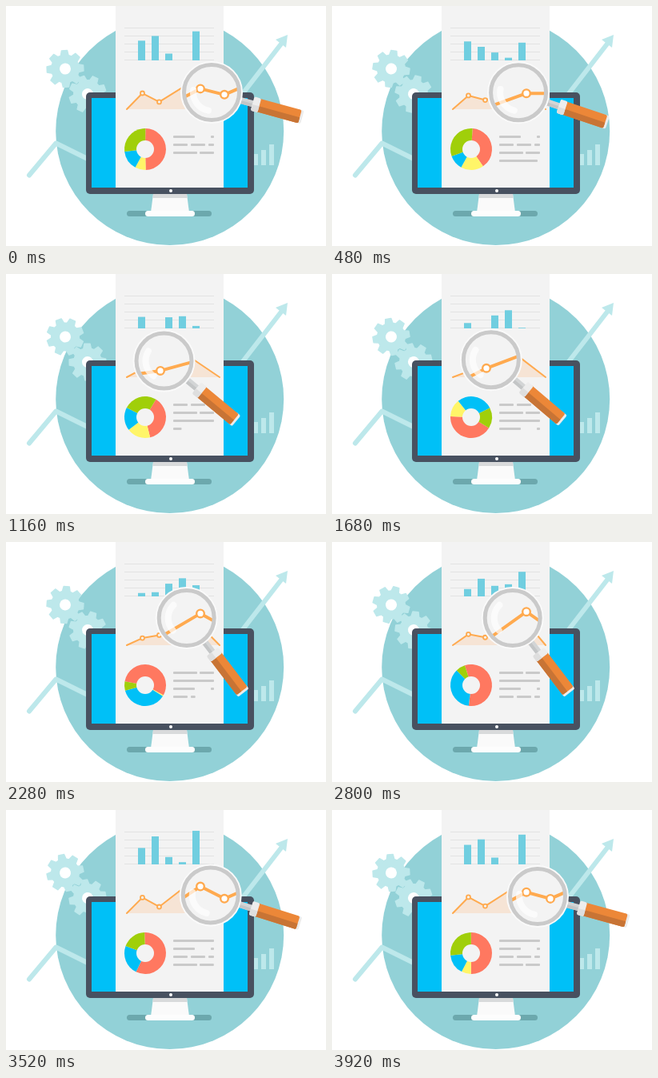
An HTML page with a canvas that plays this animation: 400x300 px, repeating every 3960 ms.

```html
<!DOCTYPE html>
<html lang="en">
<head>
<meta charset="utf-8">
<title>Report analysis</title>
<style>
  html, body { margin: 0; width: 100%; height: 100%; overflow: hidden; background: #fff; }
  canvas { display: block; width: 400px; height: 300px; }
</style>
</head>
<body>
<canvas id="stage"></canvas>
<script>
const LOOP = 3960;
const TAU = Math.PI * 2;
const RAD = TAU / 360;
const LIGHT = '#bde8eb', PAPER = '#f3f3f3', ORANGE = '#ffaa4f', GREY = '#cacaca';

const canvas = document.getElementById('stage');
const ctx = canvas.getContext('2d');
const ratio = window.devicePixelRatio || 1;
canvas.width = 400 * ratio;
canvas.height = 300 * ratio;

const clamp = (v, low, high) => Math.min(high, Math.max(low, v));
const mix = (a, b, p) => a + (b - a) * p;
const ease = p => (1 - Math.cos(Math.PI * clamp(p, 0, 1))) / 2;

// One swing per loop, highest at `peak` degrees of the cycle.
const wave = (mean, swing, peak) => t =>
  mean + swing * Math.cos(t / LOOP * TAU - peak * RAD);
const still = y => () => y;

const bars = [
  wave(14.5, 10.5, 15),
  wave(14, 21, -38),
  wave(12.5, 4, 175),
  wave(12, 12, 180),
  wave(21, 21, -43)
];

const chart = [
  [151, still(129)],
  [170.5, wave(115.3, 6.5, 165)],
  [191.5, wave(117.5, 3.5, -45)],
  [233, wave(96.5, 9.5, 105)],
  [267, still(129)]
];

const zoomed = [
  [150, wave(131, 16, 210)],
  [193, wave(123.5, 6, -10)],
  [243, wave(98.5, 11.5, 65)],
  [273, wave(108, 3, -20)],
  [305, still(97)]
];

const yellowShare = wave(28, 50, 88);
const blueShare = wave(88, 47, 225);
const greenShare = wave(68, 46, 50);

// The magnifier travels between three resting poses.
const right = { x: 257, y: 108, angle: 15.3 };
const left = { x: 197.5, y: 108.6, angle: 39.7 };
const upper = { x: 225.7, y: 95, angle: 52.7 };
const moves = [
  { from: right, to: left, start: 0, end: 1100, lift: 1, swing: 2.2 },
  { from: left, to: upper, start: 1600, end: 2180, lift: 0.75, swing: 1 },
  { from: upper, to: right, start: 2860, end: 3620, lift: 3, swing: 1.5 }
];

// Words of each text line as [offset, width].
const paragraph = [
  [[0, 27], [47, 4]],
  [[0, 18], [22, 18], [44, 7]],
  [[0, 30], [33, 18]],
  [[0, 51]]
];

function rect(x, y, w, h, color, r = 0) {
  ctx.fillStyle = color;
  ctx.beginPath();
  ctx.roundRect(x, y, w, h, r);
  ctx.fill();
}

function disc(x, y, r, color) {
  ctx.fillStyle = color;
  ctx.beginPath();
  ctx.arc(x, y, r, 0, TAU);
  ctx.fill();
}

function arc(x, y, r, width, color, from = 0, to = TAU) {
  ctx.strokeStyle = color;
  ctx.lineWidth = width;
  ctx.beginPath();
  ctx.arc(x, y, r, from, to);
  ctx.stroke();
}

function trace(points) {
  ctx.beginPath();
  points.forEach(([x, y]) => ctx.lineTo(x, y));
}

function polygon(points, color) {
  trace(points);
  ctx.fillStyle = color;
  ctx.fill();
}

function line(points, width, color) {
  trace(points);
  ctx.strokeStyle = color;
  ctx.lineWidth = width;
  ctx.lineCap = ctx.lineJoin = 'round';
  ctx.stroke();
}

function marker([x, y], r, width, fill) {
  disc(x, y, r, fill);
  arc(x, y, r, width, ORANGE);
}

const place = (points, t) => points.map(([x, y]) => [x, y(t)]);

function gear(x, y, angle) {
  ctx.save();
  ctx.translate(x, y);
  ctx.rotate(angle * RAD);
  disc(0, 0, 18, LIGHT);
  for (let i = 0; i < 8; i++) {
    const tooth = [[-5, -16], [-3.6, -22.8], [3.6, -22.8], [5, -16]];
    polygon(tooth, LIGHT);
    line(tooth, 1.4, LIGHT);
    ctx.rotate(TAU / 8);
  }
  disc(0, 0, 7, '#fff');
  ctx.restore();
}

function backdrop(t) {
  rect(0, 0, 400, 300, '#fff');
  disc(204.7, 156.5, 142.5, '#92d1d7');
  line([[29, 211.5], [62.5, 171.5], [112, 196]], 6, LIGHT);
  line([[280, 130], [345, 46]], 6, LIGHT);
  polygon([[352, 36], [337, 42], [350, 52]], LIGHT);
  [14, 19, 26].forEach((h, i) => rect(309 + 10 * i, 199 - h, 6, h, LIGHT));
  const spin = 90 * t / LOOP - 2.5;
  gear(74, 78.5, spin);
  gear(102, 110, 22.5 - spin);
}

function monitor() {
  rect(151, 256, 106, 7, '#6ca8ad', 3.5);
  polygon([[184, 235], [226, 235], [229, 258], [181, 258]], '#fafafa');
  polygon([[184, 235], [226, 235], [226.6, 240], [183.4, 240]], '#d8dadb');
  rect(174, 256, 62, 7, '#fdfdfd', 3.5);
  rect(100, 108, 210, 127, '#485160', 5);
  rect(107, 115, 195, 112, '#00c0f7');
  rect(137, 0, 135, 227, PAPER);
  disc(206, 231, 2, '#fff');
}

function barChart(t) {
  for (let y = 27; y < 68; y += 10) rect(148, y, 112, 1, '#e2e3e3');
  bars.forEach((height, i) => {
    const h = Math.max(0, height(t));
    rect(165 + 17 * i, 68 - h, 9, h, '#70cee0');
  });
}

function lineChart(t) {
  const points = place(chart, t);
  polygon(points, 'rgba(255, 165, 90, .2)');
  line(points, 2, ORANGE);
  points.slice(1, 3).forEach(p => marker(p, 2.5, 1.8, PAPER));
}

function pie(t) {
  const yellow = clamp(yellowShare(t), 0, 66);
  const blue = blueShare(t);
  const green = greenShare(t);
  const slices = [
    ['#ff7860', 360 - yellow - blue - green],
    ['#fff568', yellow],
    ['#00c0f7', blue],
    ['#a0cf0a', green]
  ];
  let from = 360 / (1 + Math.exp((1890 - t) / 310)) - 90;
  for (const [color, size] of slices) {
    ctx.fillStyle = color;
    ctx.beginPath();
    ctx.moveTo(174, 179);
    ctx.arc(174, 179, 26, from * RAD, (from + size) * RAD);
    ctx.fill();
    from += size;
  }
  disc(174, 179, 11, PAPER);
}

// The bottom line types itself, then the text jumps up one row.
function typing(t) {
  const step = LOOP / 4;
  const turn = Math.floor(t / step);
  const typed = 51 * ease((t - turn * step) / 570);
  for (let row = 0; row < 4; row++) {
    for (const [x, width] of paragraph[(turn + row) % 4]) {
      const shown = row < 3 ? width : Math.min(width, typed - x);
      if (shown > 0) rect(209 + x, 162 + 10 * row, shown, 3, GREY, Math.min(1, shown / 2));
    }
  }
}

function lensPose(t) {
  const { from, to, start, end, lift, swing } = moves.findLast(m => t >= m.start);
  const p = ease((t - start) / (end - start));
  return {
    x: mix(from.x, to.x, p),
    y: mix(from.y, to.y, p ** lift),
    angle: mix(from.angle, to.angle, p ** swing) * RAD
  };
}

function handle() {
  rect(38, -4, 18, 8, '#d3d5d6');
  rect(38, 0, 18, 4, '#c3c5c6');
  rect(110, -8.5, 7.5, 17, '#ececec', 2);
  rect(60, -8.5, 54.5, 17, '#ec8738', [0, 2, 2, 0]);
  rect(60, 1, 54.5, 7.5, '#c87435', [0, 0, 2, 0]);
  rect(53, -9, 9, 18, '#ededed', 2);
  rect(53, 1, 9, 8, '#dedede', [0, 0, 2, 2]);
}

function magnifier(t) {
  const { x, y, angle } = lensPose(t);
  ctx.save();
  ctx.translate(x, y);
  ctx.rotate(angle);
  handle();
  ctx.restore();

  disc(x, y, 39, '#fafafa');
  disc(x, y, 33, PAPER);
  ctx.save();
  ctx.beginPath();
  ctx.arc(x, y, 33, 0, TAU);
  ctx.clip();
  const points = place(zoomed, t);
  line(points, 4, ORANGE);
  points.slice(1, 4).forEach(p => marker(p, 4.8, 2.4, '#fff'));
  arc(x, y, 23, 8, 'rgba(255, 255, 255, .7)', angle + 85 * RAD, angle + 172 * RAD);
  ctx.restore();
  arc(x, y, 34.5, 5, GREY);
}

function draw(t) {
  ctx.setTransform(ratio, 0, 0, ratio, 0, 0);
  backdrop(t);
  monitor();
  barChart(t);
  lineChart(t);
  pie(t);
  typing(t);
  magnifier(t);
}

const begin = performance.now();
function frame() {
  draw((performance.now() - begin) % LOOP);
  requestAnimationFrame(frame);
}
frame();
</script>
</body>
</html>
```
